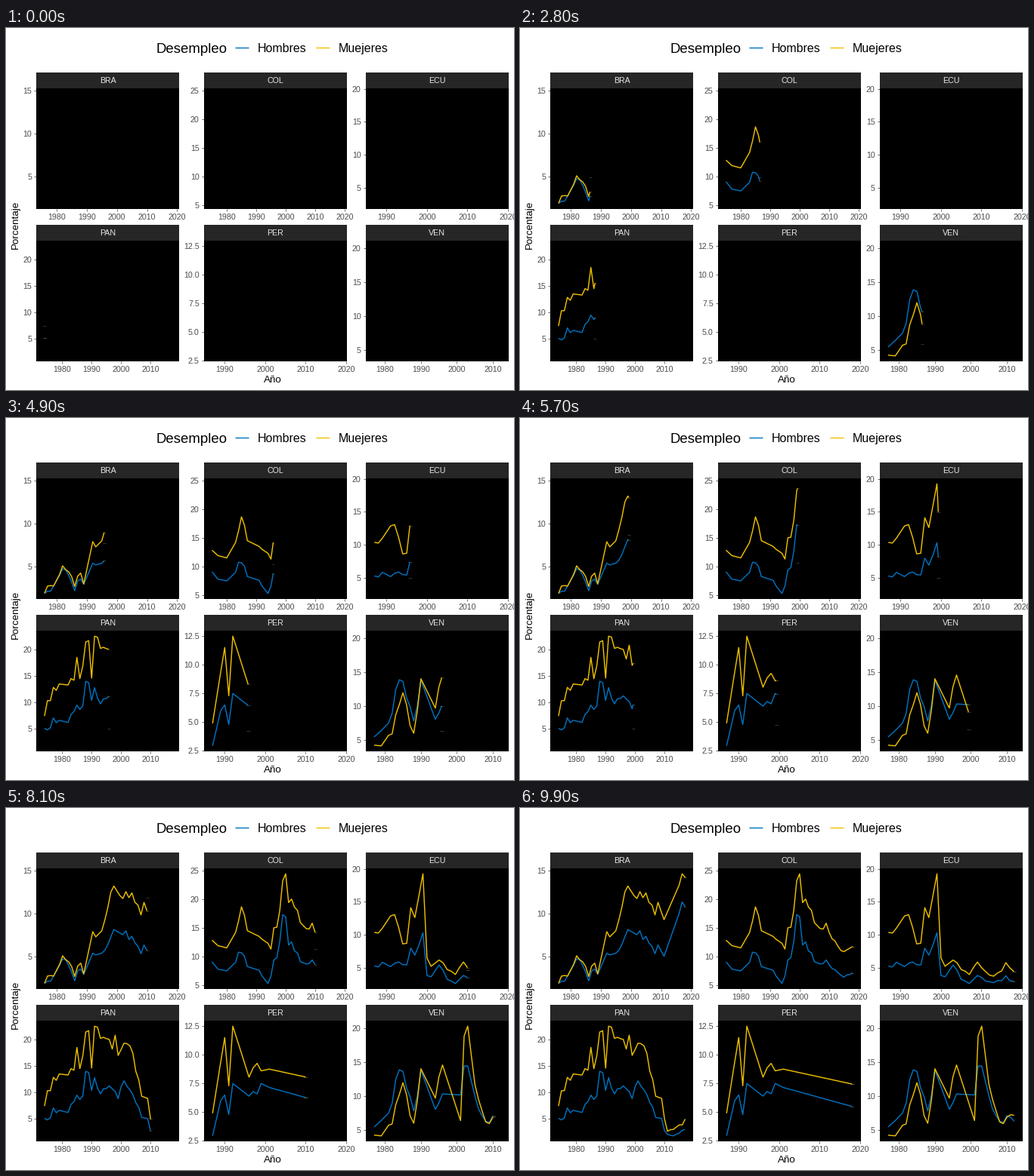
Animation of 672x480 px, one loop 10000 ms. Source, as a matplotlib script:

```python
import numpy as np
import matplotlib.pyplot as plt
from matplotlib.animation import FuncAnimation
from matplotlib.lines import Line2D
from matplotlib.patches import Rectangle
from matplotlib.ticker import MultipleLocator, FormatStrFormatter

W, H, DPI = 672, 480, 96
FRAMES = 100
START, END = 1974, 2018
BLUE, YELLOW, CAP = "#0073C2", "#EFC000", "#a08c5a"
LINE = 1.07

plt.rcParams["font.family"] = "Liberation Sans"
fig = plt.figure(figsize=(W / DPI, H / DPI), dpi=DPI, facecolor="white")


def label(x, y, s, size, color="black", **kw):
    return fig.text(x / W, 1 - y / H, s, fontsize=size, color=color, va="baseline", **kw)


def key(x, y, color):
    fig.add_artist(Line2D([x / W, (x + 18.4) / W], [1 - y / H] * 2,
                          color=color, lw=LINE, solid_capstyle="butt"))


def span(a, b):
    return range(a, b + 1)


def padded(lo, hi):
    pad = 0.05 * (hi - lo)
    return lo - pad, hi + pad


class Panel:
    lefts, tops = (40.4, 262, 476), (80, 282)
    width, height, strip = 188.6, 160, 20.8

    def __init__(self, name, col, row, years, men, women, step=5, fmt="%d"):
        self.years = np.array([*years], float)
        self.series = np.array(men), np.array(women)
        x, y = self.lefts[col], self.tops[row]
        w, h, s = self.width, self.height, self.strip

        fig.add_artist(Rectangle((x / W, 1 - y / H), w / W, s / H, fc="#262626", lw=0))
        label(x + w / 2, y - 6.6, name, 8, "#e6e6e6", ha="center")

        ax = fig.add_axes([x / W, 1 - (y + h) / H, w / W, h / H], facecolor="black")
        ax.spines[:].set_visible(False)
        ax.set_xlim(padded(self.years[0] - 0.5, self.years[-1] + 0.5))
        ax.set_ylim(padded(np.min(self.series), np.max(self.series)))
        ax.xaxis.set_major_locator(MultipleLocator(10))
        ax.yaxis.set_major_locator(MultipleLocator(step))
        ax.yaxis.set_major_formatter(FormatStrFormatter(fmt))
        ax.tick_params(length=2.5, width=0.53, color="#333333", labelsize=8,
                       labelcolor="#4d4d4d", pad=2.2)

        self.lines = [ax.plot([], [], color=c, lw=LINE, solid_capstyle="butt")[0]
                      for c in (BLUE, YELLOW)]
        self.caps = [ax.plot([], [], color=CAP, lw=0.6, alpha=0.45,
                             solid_capstyle="butt", zorder=3)[0] for _ in range(3)]

    def reveal(self, t):
        yrs = self.years
        men, women = self.series
        seen = yrs <= t
        live = yrs[0] <= t <= yrs[-1]
        heads = [np.interp(t, yrs, v) for v in self.series]
        for line, vals, head in zip(self.lines, self.series, heads):
            xs, ys = yrs[seen], vals[seen]
            if live:
                xs, ys = np.append(xs, t), np.append(ys, head)
            line.set_data(xs, ys)
        # a third cap drifts from the first value to the last one
        heads.append(np.interp(t, [yrs[0], yrs[-1]], [men[0], women[-1]]))
        for cap, head in zip(self.caps, heads):
            cap.set_data(*(([t - 0.5, t + 0.5], [head, head]) if live else ([], [])))


bra = Panel(
    "BRA", 0, 0,
    [*span(1976, 1979), *span(1981, 1989), 1992, 1993, *span(1995, 1999),
     *span(2001, 2009), 2011, *span(2016, 2018)],
    [1.88, 2.15, 2.15, 2.75, 4.0, 4.75, 4.65, 4.0, 3.2, 2.2, 3.35, 3.55, 2.95,
     5.4, 5.2, 5.4, 5.75, 6.4, 7.3, 8.15, 7.75, 7.55, 8.0, 7.0, 7.35, 6.6, 6.2,
     5.35, 6.35, 5.05, 10.0, 11.35, 10.8],
    [1.9, 2.75, 2.8, 2.75, 4.1, 5.1, 4.65, 4.4, 3.85, 2.7, 3.9, 4.25, 3.0,
     7.9, 7.3, 8.0, 9.25, 10.7, 12.5, 13.2, 12.1, 11.75, 12.55, 11.85, 12.4,
     11.3, 11.0, 9.85, 11.3, 9.3, 13.3, 14.62, 14.2])

col = Panel(
    "COL", 1, 0,
    [1975, 1977, 1980, *span(1983, 1987), 1991, 1992, *span(1994, 2005),
     *span(2007, 2018)],
    [9.1, 7.8, 7.5, 9.0, 10.75, 10.65, 10.05, 8.25, 7.6, 6.6, 5.3, 6.6, 9.4,
     9.8, 12.6, 17.3, 16.9, 12.0, 12.55, 10.95, 10.65, 9.1, 8.7, 8.8, 9.4, 8.6,
     7.9, 7.7, 7.2, 6.75, 6.4, 6.8, 6.85, 7.15],
    [12.85, 11.9, 11.5, 14.2, 16.2, 18.65, 17.2, 14.5, 13.5, 13.0, 12.3, 11.3,
     15.0, 15.1, 18.0, 23.2, 24.4, 19.4, 20.0, 18.6, 18.05, 15.9, 14.85, 14.8,
     15.8, 14.2, 13.1, 12.7, 11.8, 11.05, 10.85, 11.15, 11.45, 11.75])

ecu = Panel(
    "ECU", 2, 0,
    [*span(1987, 1989), *span(1991, 2001), *span(2003, 2018)],
    [5.25, 5.1, 5.8, 5.15, 5.65, 5.85, 5.45, 5.4, 7.95, 6.9, 8.4, 10.3, 3.8,
     3.6, 5.4, 4.55, 3.2, 2.95, 2.58, 3.2, 3.8, 3.5, 2.95, 2.85, 2.7, 3.05,
     3.0, 3.75, 3.0, 2.9],
    [10.35, 10.25, 11.0, 12.85, 13.05, 11.1, 8.6, 8.7, 14.1, 12.6, 15.9, 19.25,
     6.45, 5.2, 6.15, 5.7, 4.7, 4.45, 3.95, 5.0, 5.85, 5.0, 4.4, 3.85, 3.7,
     4.2, 4.5, 5.75, 4.95, 4.4])

pan = Panel(
    "PAN", 0, 1,
    [*span(1974, 1979), *span(1982, 2017)],
    [5.15, 4.85, 5.25, 7.1, 6.2, 6.65, 6.25, 7.75, 8.3, 9.5, 8.7, 9.35, 14.0,
     13.75, 10.4, 12.8, 10.85, 9.75, 10.7, 10.75, 11.25, 10.7, 10.2, 8.85,
     11.1, 12.2, 11.2, 10.5, 9.6, 8.1, 7.2, 5.3, 5.2, 5.1, 2.8, 2.15, 1.95,
     1.84, 2.15, 2.35, 2.9, 3.05],
    [7.45, 10.35, 10.35, 12.85, 12.3, 13.5, 13.3, 14.5, 14.2, 18.5, 14.5, 16.9,
     21.4, 21.65, 14.6, 22.5, 22.3, 20.2, 20.4, 20.15, 20.0, 18.2, 20.8, 17.0,
     18.1, 19.3, 19.2, 18.8, 17.4, 14.0, 12.4, 9.3, 9.1, 8.9, 5.0, 2.7, 3.0,
     3.05, 3.5, 3.9, 3.9, 5.0])

per = Panel(
    "PER", 1, 1,
    [1987, *span(1989, 1992), *span(1996, 1999), 2001, 2018],
    [2.94, 6.0, 6.5, 4.8, 7.5, 6.4, 6.8, 6.6, 7.5, 7.15, 5.5],
    [4.9, 9.35, 11.5, 7.3, 12.49, 8.05, 8.85, 9.25, 8.6, 8.75, 7.45],
    step=2.5, fmt="%.1f")

ven = Panel(
    "VEN", 2, 1,
    [1977, 1979, *span(1981, 1990), *span(1994, 1996), *span(2001, 2003),
     *span(2005, 2012)],
    [5.45, 6.4, 7.5, 8.9, 12.4, 13.85, 13.6, 11.2, 9.9, 7.8, 10.0, 13.8, 8.05,
     9.0, 10.3, 10.15, 14.4, 14.4, 10.0, 8.1, 7.1, 6.3, 6.1, 7.1, 6.9, 6.3],
    [4.25, 4.15, 5.7, 5.9, 8.7, 10.2, 11.95, 10.2, 7.1, 6.0, 9.3, 14.0, 9.7,
     12.8, 14.55, 6.4, 18.8, 20.25, 11.7, 9.5, 7.8, 6.2, 5.95, 6.9, 7.25, 7.15])

panels = [bra, col, ecu, pan, per, ven]

label(198, 33, "Desempleo", 14)
key(302.8, 26.3, BLUE)
label(332.3, 32, "Hombres", 12)
key(409.8, 26.3, YELLOW)
label(439.3, 32, "Muejeres", 12)
label(352.5, 470, "Año", 10, ha="center")
label(16.3, 261, "Porcentaje", 10, ha="center", rotation=90, rotation_mode="anchor")


def update(i):
    t = START + (END - START) * i / (FRAMES - 1)
    for p in panels:
        p.reveal(t)
    return [a for p in panels for a in p.lines + p.caps]


anim = FuncAnimation(fig, update, frames=FRAMES, interval=100, repeat=True,
                     repeat_delay=0, blit=False)
plt.show()
```
